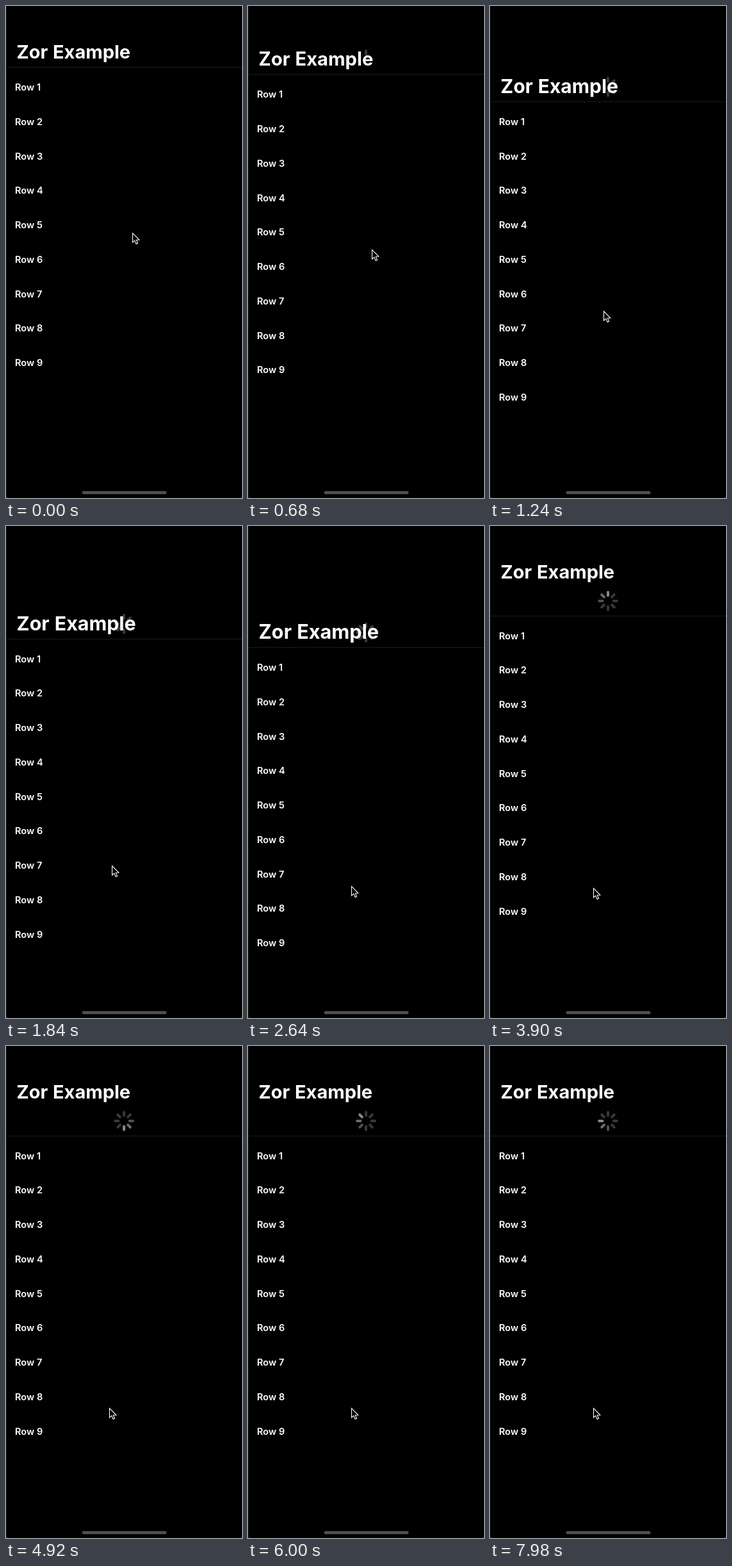
An HTML page with a canvas for the animation above (8000 ms loop, 368 by 768 pixels).

```html
<!DOCTYPE html>
<html lang="en">
<head>
<meta charset="utf-8">
<title>Pull to refresh</title>
<style>
  html, body { margin: 0; width: 100%; height: 100%; overflow: hidden; background: #000; }
  canvas { display: block; width: 368px; height: 768px; }
</style>
</head>
<body>
<canvas id="stage"></canvas>
<script>
const W = 368, H = 768, LOOP = 8000;
const INK = '#fefefa', BAR = '#505050', FAINT = '#1b1b1b', SPOKE = '#38383a';
const SPOKE_TRAIL = ['#8a8a86', '#6c6c6a', '#505050'];
const canvas = document.getElementById('stage');
const ctx = canvas.getContext('2d');
const dpr = window.devicePixelRatio || 1;
canvas.width = W * dpr;
canvas.height = H * dpr;

// step, pull distance, pointer x, pointer y
const DRAG = [
  [0, 0, 197, 354],
  [7, 0, 197, 354],
  [17, 19.5, 190, 398],
  [26, 53.8, 177, 475.5],
  [34, 71.5, 169, 513],
  [40, 80.6, 165, 530],
  [52, 91, 161.5, 554],
  [56, 94, 161, 562],
  [61, 95.5, 161, 565],
  [180, 95.5, 161, 565]
];
const RELEASE = 66.3, REST = 44.7, TRIGGER = 85;

// The picture advances three times per 140 ms, held for 20, 100 and 20 ms.
function stepAt(ms) {
  const rest = ms % 140;
  return 3 * Math.floor(ms / 140) + (rest < 20 ? 0 : rest < 120 ? 1 : 2);
}

function slope(i, col) {
  return (DRAG[i + 1][col] - DRAG[i][col]) / (DRAG[i + 1][0] - DRAG[i][0]);
}

function tangent(i, col) {
  if (i === 0 || i === DRAG.length - 1) return 0;
  const a = slope(i - 1, col), b = slope(i, col);
  return a * b <= 0 ? 0 : 2 * a * b / (a + b);
}

// Monotone cubic through the drag points
function drag(step, col) {
  let i = 0;
  while (i < DRAG.length - 2 && step >= DRAG[i + 1][0]) i++;
  const span = DRAG[i + 1][0] - DRAG[i][0];
  const u = (step - DRAG[i][0]) / span, v = 1 - u;
  return DRAG[i][col] * v * v * (1 + 2 * u) + DRAG[i + 1][col] * u * u * (3 - 2 * u)
    + span * u * v * (tangent(i, col) * v - tangent(i + 1, col) * u);
}

function settle(step) {
  const x = 0.42 * Math.max(0, step - RELEASE);
  return Math.min(1, (1 - (1 + x) * Math.exp(-x)) / 0.99);
}

function line(x1, y1, x2, y2, color, width) {
  ctx.strokeStyle = color;
  ctx.lineWidth = width;
  ctx.beginPath();
  ctx.moveTo(x1, y1);
  ctx.lineTo(x2, y2);
  ctx.stroke();
}

function fillRounded(x, y, w, h, radii, color) {
  ctx.fillStyle = color;
  ctx.beginPath();
  ctx.roundRect(x, y, w, h, radii);
  ctx.fill();
}

function drawScreen() {
  ctx.fillStyle = FAINT;
  ctx.fillRect(0, 0, W, H);
  fillRounded(1, 0, W - 1, H, [0, 0, 5, 5], '#000');
}

function drawSpinner(y, pull, step) {
  const spinning = step >= 58;
  const visible = spinning ? 8 : Math.min(8, Math.floor(pull / TRIGGER * 8));
  const head = Math.floor((step - 83) / 1.92 + 0.3);
  ctx.save();
  ctx.translate(184, y);
  ctx.lineCap = 'round';
  for (let i = 0; i < visible; i++) {
    const age = (((head - i) % 8) + 8) % 8;
    ctx.save();
    ctx.rotate(i * Math.PI / 4);
    line(0, -8.6, 0, -13.8, spinning && SPOKE_TRAIL[age] || SPOKE, 4);
    ctx.restore();
  }
  ctx.restore();
}

function drawTitle(baseline, shift) {
  const scale = 1 + shift * 0.0006;
  ctx.save();
  ctx.translate(16.5, baseline);
  ctx.scale(scale, scale);
  ctx.font = '700 29px Inter, sans-serif';
  ctx.fillStyle = INK;
  ctx.fillText('Zor', 0, 0);
  ctx.fillText('Example', 56.5, 0);
  ctx.restore();
}

function drawRows(offset) {
  ctx.font = '600 14.6px Inter, sans-serif';
  ctx.fillStyle = INK;
  for (let i = 0; i < 9; i++) ctx.fillText('Row ' + (i + 1), 14, 132 + offset + i * 53.75);
}

function drawPointer(x, y) {
  const outline = [[0, 0], [0, 14.5], [3.3, 11.6], [5.6, 17], [8, 16], [5.8, 10.7], [10.3, 10.5]];
  ctx.save();
  ctx.translate(Math.round(x) + 0.5, Math.round(y) + 0.5);
  ctx.beginPath();
  outline.forEach(([px, py]) => ctx.lineTo(px, py));
  ctx.closePath();
  ctx.fillStyle = '#000';
  ctx.fill();
  ctx.strokeStyle = INK;
  ctx.lineWidth = 1.1;
  ctx.stroke();
  ctx.restore();
}

function draw(ms) {
  const step = stepAt(ms);
  const pull = drag(step, 1);
  const back = settle(step);
  const content = pull + (REST - pull) * back;
  const titleShift = pull * (1 - back);
  const separator = Math.round(95 + content) + 0.5;

  ctx.setTransform(dpr, 0, 0, dpr, 0, 0);
  drawScreen();
  line(0, separator, W, separator, FAINT, 1);
  drawSpinner(72.3 + content, pull, step);
  drawTitle(82 + titleShift, titleShift);
  drawRows(content);
  fillRounded(118.5, 757.3, 132, 4.6, 2.3, BAR);
  drawPointer(drag(step, 2), drag(step, 3));
}

function tick() {
  draw(performance.now() % LOOP);
  requestAnimationFrame(tick);
}
tick();
</script>
</body>
</html>
```
